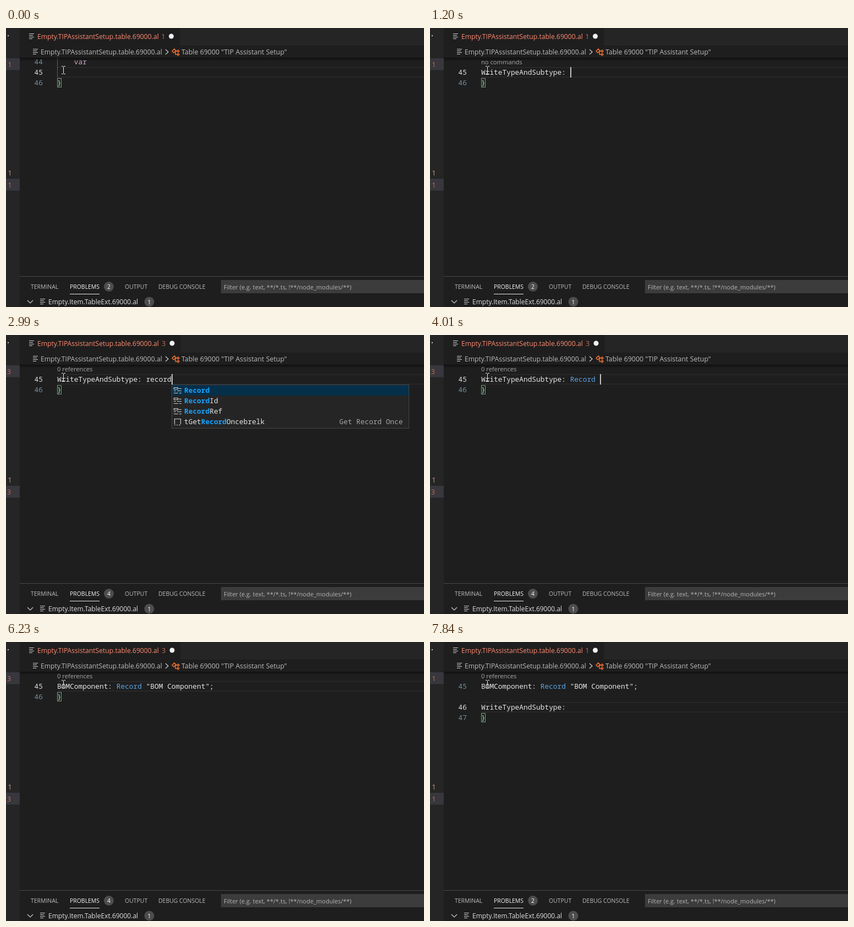
Recreate the animation shown at these times as an HTML page. Size 760 px wide and 507 px high, loop 8000 ms.

```html
<!DOCTYPE html>
<html lang="en">
<head>
<meta charset="utf-8">
<title>Editor snippet</title>
<style>
html, body { margin: 0; width: 100%; height: 100%; overflow: hidden; background: #1e1e1e; }
svg { display: block; width: 760px; height: 507px; }
text { font: 12.15px "Open Sans", "Noto Sans", sans-serif; fill: #bcbcbc; white-space: pre; }
text.code { font: 12.83px "Noto Sans Mono", "DejaVu Sans Mono", monospace; fill: #e6e6e6; }
text.small { font-size: 10.45px; }
text.lens { font-size: 11.2px; fill: #a8a8a8; }
text.filter { font-size: 11px; fill: #b4b4b4; }
text.badge { font-size: 10.5px; fill: #fff; text-anchor: middle; }
.match { fill: #18a3ff; font-weight: 700; }
.line { fill: none; stroke: #d0d0d0; stroke-width: 1.2; }
.orange { stroke: #f0702f; stroke-width: 1.5; }
.amber { stroke: #e8a23d; stroke-width: 1.3; }
</style>
</head>
<body>
<svg viewBox="0 0 760 507">
  <defs>
    <linearGradient id="shade" x2="0" y2="1">
      <stop stop-color="#000" stop-opacity=".5"/>
      <stop offset="1" stop-color="#000" stop-opacity="0"/>
    </linearGradient>
    <path id="file" d="M0 .5h9M0 3.500h7M0 6.500h9M0 9.500h6"/>
    <path id="table" d="M1 5l4-4 3 3-4 4zM7 5h3M7 5v6h3M10 5l2-2 2 2-2 2zM10 11l2-2 2 2-2 2z"/>
    <path id="keyword" d="M.5 1.500h7v3h-7zM9 3.500h5M0 7.500h4M6 7.500h8M0 11.500h8M10 11.500h4"/>
    <path id="snippet" d="M1.500 11V1.500h11V11M1 12.500h2m2 0h2m2 0h3"/>
  </defs>
  <rect width="760" height="507" fill="#1e1e1e"/>
  <g id="editor"></g>
  <rect x="25" y="30" width="735" height="24" fill="#1e1e1e"/>
  <rect x="25" y="54" width="735" height="6" fill="url(#shade)"/>
  <use href="#file" class="line" x="49" y="38"/>
  <text x="63" y="48">Empty.TIPAssistantSetup.table.69000.al</text>
  <path class="line" d="M290 39l5 4.5-5 4.5"/>
  <use href="#table" class="line orange" x="301" y="37"/>
  <text x="319" y="48" style="font-size:12.4px">Table 69000 "TIP Assistant Setup"</text>
  <rect y="451" x="25" width="735" height="56" fill="#1e1e1e"/>
  <rect y="451" x="25" width="735" height="1" fill="#484848"/>
  <text class="small" x="45" y="474">TERMINAL</text>
  <text class="small" x="116" y="474" style="fill:#f4f4f4">PROBLEMS</text>
  <rect x="116" y="483" width="54" height="1" fill="#e7e7e7"/>
  <text class="small" x="216" y="474">OUTPUT</text>
  <text class="small" x="277" y="474">DEBUG CONSOLE</text>
  <rect x="391" y="458" width="369" height="24" fill="#3c3c3c"/>
  <text class="filter" x="396" y="475">Filter (e.g. text, **/*.ts, !**/node_modules/**)</text>
  <path class="line" d="M39 495l5 5 5-5"/>
  <use href="#file" class="line" x="62" y="492"/>
  <text x="77" y="502" style="fill:#e0e0e0;font-size:12px">Empty.Item.TableExt.69000.al</text>
  <circle cx="260.5" cy="497.5" r="9" fill="#4d4d4d"/>
  <text class="badge" x="260.5" y="501.5">1</text>
  <g id="problems"></g>
  <g id="popup"></g>
  <path d="M101 69.500h2.500l1 1 1-1h2.500M104.500 70.500v12M101 83.500h2.500l1-1 1 1h2.500" fill="none" stroke="#f0f0f0"/>
</svg>
<script>
const LOOP = 8000, LEFT = 93, CHAR = 7.7, ROW = 19, POPUP_WIDTH = 432, DOC_WIDTH = 331;
const NAME = 'WriteTypeAndSubtype: ';
const DONE = 'BOMComponent: Record "BOM Component";';

const lists = {
  snippet: {
    icon: 'snippet',
    rows: ['tVariable', 'tVarRecord', 'tVarCodeunit', 'tVarPage', 'tVarText', 'tTable', 'tTableExt',
      'tTrigger', 'tPage', 'tPageExt', 'tProcedure', 'tReport']
  },
  type: {
    icon: 'keyword',
    rows: ['Record', 'RecordId', 'RecordRef', 'Report', 'ReportFormat', 'KeyRef', 'XmlReadOptions',
      'HttpRequestMessage', 'HttpResponseMessage', 'tGetRecordOncebrelk', 'FieldRef', 'WebServiceActionResultCode']
  },
  table: {
    icon: 'table',
    rows: ['BOM Component', 'Production BOM Comment Line', 'BOM Buffer', 'BOM Warning Log', 'Production BOM Header',
      'Production BOM Line', 'Production BOM Version', 'Assembly BOM Entry', 'Where-Used BOM Line',
      'Planning BOM Buffer', 'Service BOM Item', 'BOM Tree Node'].map(name => `"${name}"`)
  }
};

// Each step changes only the listed parts of the state.
const steps = [
  [0, { text: '', active: 45, lens: '', errors: 1, caret: false, list: null, query: '', docs: false }],
  [200, { text: 't', query: 't', list: 'snippet', caret: true, docs: true }],
  [400, { text: 'tv', query: 'tv' }],
  [790, { text: 'tva', query: 'tva' }],
  [1000, { text: NAME, list: null, docs: false }],
  [1200, { lens: 'no commands' }],
  [1400, { text: NAME + 'r', query: 'r' }],
  [1600, { list: 'type' }],
  [2000, { errors: 3, lens: '0 references' }],
  ...['re', 'rec', 'reco', 'recor', 'record'].map((query, i) =>
    [[2200, 2390, 2600, 2800, 2990][i], { text: NAME + query, query }]),
  [3390, { text: NAME + 'Record', list: null }],
  [3610, { text: NAME + 'Record ' }],
  [4210, { text: NAME + 'Record b', query: 'b', list: 'table' }],
  [4410, { text: NAME + 'Record bo', query: 'bo' }],
  [4610, { text: NAME + 'Record bom', query: 'bom' }],
  [4810, { docs: true }],
  [5010, { text: NAME + 'Record bom ' }],
  [5220, { text: NAME + 'Record bom co', query: 'bom co' }],
  [5420, { text: NAME + 'Record bom com', query: 'bom com' }],
  [5620, { text: NAME + 'Record "BOM Component"', list: null, docs: false }],
  [5830, { text: DONE }],
  [6230, { caret: false }],
  [6430, { text: '', active: 46, caret: true }],
  [6630, { errors: 1 }],
  [6840, { text: 't', query: 't', list: 'snippet', docs: true }],
  [7030, { text: 'tv', query: 'tv' }],
  [7230, { text: 'tva', query: 'tva' }],
  [7440, { text: NAME, list: null, docs: false }],
  [7640, { gap: true }],
  [7840, { caret: false }]
];

const text = (x, y, body, cls = '', fill = '') =>
  `<text x="${x}" y="${y}" class="${cls}"${fill && ` style="fill:${fill}"`}>${body}</text>`;
const rect = (x, y, w, h, fill, stroke = 'none') =>
  `<rect x="${x}" y="${y}" width="${w}" height="${h}" fill="${fill}" stroke="${stroke}"/>`;
const code = (y, body) =>
  text(LEFT, y + 14, body.replace('Record', '<tspan fill="#5aa5e6">Record</tspan>'), 'code');
const lineNumber = (y, n, active) => text(51.5, y + 14, n, 'code', active ? '#e0e0e0' : '#738e9c');
const caretX = s => Math.round(LEFT + s.text.length * CHAR);

function activeTop(s) {
  return s.active === 45 ? 71 : s.gap ? 109 : 90;
}

function drawEditor(s) {
  const top = activeTop(s), brace = top + ROW;
  let out = rect(LEFT, top, 667, 1.5, '#2b2b2b') + rect(LEFT, top + 17.5, 667, 1.5, '#2b2b2b');
  if (s.lens) {
    out += text(LEFT, 66, s.lens, 'lens');
  } else {
    out += lineNumber(52, 44) + text(LEFT + 4 * CHAR, 66, 'var', 'code', '#d3a9c6')
      + rect(LEFT, 54, 1, 36, '#606060');
  }
  if (s.active === 46) out += lineNumber(71, 45) + code(71, DONE);
  out += lineNumber(top, s.active, true) + code(top, s.text) + lineNumber(brace, s.active + 1);
  out += rect(LEFT + .5, brace + 1.5, 7, 16, '#1b2a1b', '#8c8c8c')
    + text(LEFT, brace + 14, '}', 'code', '#b9d3e2');
  if (s.caret) out += rect(caretX(s), top, 2, ROW, '#c4c4c4');
  return out;
}

function drawProblems(s) {
  const shift = s.errors > 1 ? 1.5 : 0, dim = '#c8705a', bright = '#ff8a70';
  const rows = [[66, s.errors, 1], [263, 1, 0], [285, s.errors, 1]];
  return rect(0, 0, 25, 507, '#252526') + rect(316 + shift, 0, 444, 32, '#252526')
    + rect(3, 13, 2, 2, '#d8c0b8')
    + rows.map(([y, n, lit]) => (lit ? rect(0, y - 11, 25, 21.5, '#37373d') : '')
      + text(n > 1 ? 2 : 3.5, y + 4.5, n, '', lit ? dim : '#d9a283')).join('')
    + '<use href="#file" class="line" x="42" y="10"/>'
    + text(57, 20, 'Empty.TIPAssistantSetup.table.69000.al', '', bright)
    + text(282.5 + shift / 2, 19.5, s.errors, '', dim)
    + `<circle cx="${300.5 + shift}" cy="15" r="4.5" fill="#f0f0f0"/>`
    + '<circle cx="187" cy="470" r="9" fill="#4d4d4d"/>' + text(187, 474, s.errors + 1, 'badge');
}

function highlight(label, query) {
  let out = '', from = 0;
  for (const word of query.split(' ')) {
    const at = label.toLowerCase().indexOf(word, from);
    if (at < 0) continue;
    const end = at + word.length;
    out += `${label.slice(from, at)}<tspan class="match">${label.slice(at, end)}</tspan>`;
    from = end;
  }
  return out + label.slice(from);
}

function matches(label, query) {
  const lower = label.toLowerCase();
  return query.split(' ').every(word => lower.includes(word));
}

function drawDocs(s, x, y, first) {
  if (s.list === 'table') {
    const left = x - DOC_WIDTH;
    return rect(left + .5, y + .5, DOC_WIDTH, 40, '#252526', '#454545')
      + text(left + 6, y + 19, 'Table ' + first, 'code', '#b4b4b4')
      + `<path class="line" d="M${left + 315} ${y + 10}l8 8m0-8l-8 8"/>`;
  }
  const left = x + POPUP_WIDTH;
  return rect(left + .5, y + .5, 760 - left, 141, '#252526', '#454545')
    + text(left + 6, y + 19, 'Snippet: Variable', 'code', '#b4b4b4')
    + text(left + 6, y + 47, NAME, 'code', '#b4b4b4');
}

function drawPopup(s) {
  if (!s.list) return '';
  const { icon, rows } = lists[s.list];
  const shown = s.list === 'snippet' ? rows : rows.filter(row => matches(row, s.query));
  const x = caretX(s), y = activeTop(s) + ROW;
  let out = s.docs ? drawDocs(s, x, y, shown[0]) : '';
  out += rect(x + .5, y + .5, POPUP_WIDTH - 1, shown.length * ROW + 3, '#252526', '#454545')
    + rect(x + 1, y + 1, POPUP_WIDTH - 2, ROW, '#062f4a');
  shown.forEach((label, i) => {
    const top = y + 1 + i * ROW, isSnippet = label.startsWith('tGet');
    out += `<use href="#${isSnippet ? 'snippet' : icon}" class="line ${icon === 'table' ? 'amber' : ''}" x="${x + 4}" y="${top + 3}"/>`
      + text(x + 23, top + 14, highlight(label, s.query), 'code');
    if (isSnippet) out += text(x + 305, top + 14, 'Get Record Once', 'code', '#a6a6a6');
  });
  if (shown.length === 12) {
    out += `<rect x="${x + 421}" y="${y + 1}" width="10" height="214" fill="#797979" opacity=".15"/>`;
  }
  return out;
}

const layers = { editor: drawEditor, problems: drawProblems, popup: drawPopup };
let current = -1;

function tick(now) {
  const time = now % LOOP;
  const count = steps.filter(([start]) => start <= time).length;
  if (count !== current) {
    current = count;
    const state = Object.assign({}, ...steps.slice(0, count).map(([, change]) => change));
    for (const id in layers) document.getElementById(id).innerHTML = layers[id](state);
  }
  requestAnimationFrame(tick);
}
tick(0);
</script>
</body>
</html>
```
